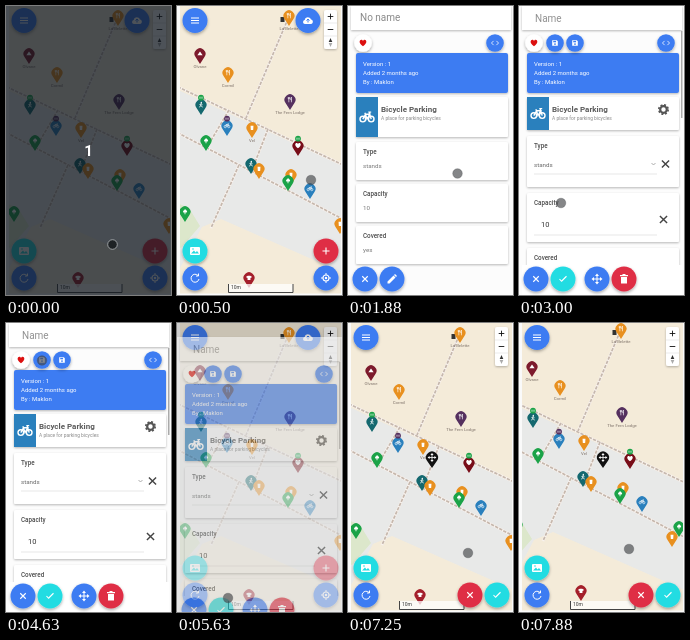
An HTML page that plays this animation: 165x289 px, repeating every 8000 ms.

```html
<!DOCTYPE html>
<html lang="en">
<head>
<meta charset="utf-8">
<title>Map editor</title>
<style>
html, body { margin: 0; width: 100%; height: 100%; overflow: hidden; background: #fafafa; }
svg { display: block; width: 100vw; height: 100vh; font-family: Roboto, "Open Sans", sans-serif; }
</style>
</head>
<body>
<svg id="stage" viewBox="0 0 165 289" preserveAspectRatio="none"></svg>
<script>
const LOOP = 8000, STEP = 125;
const BLUE = '#3c7cf2', CYAN = '#22dce2', RED = '#df2d45';
const ORANGE = '#e8901f', TEAL = '#14686f', GREEN = '#1ba348', BIKE = '#2a80bd', MAROON = '#7d1a2c', PURPLE = '#55305f';

// Icons are drawn around the origin in a box from -10 to 10.
const line = (d, w = 2.2) => `<path d="${d}" fill="none" stroke="currentColor" stroke-width="${w}" stroke-linejoin="round"/>`;
const solid = d => `<path d="${d}" fill="currentColor"/>`;
const ICONS = {
  menu: line('M-8-5H8M-8 0H8M-8 5H8', 2),
  cloud: solid('M-6 7C-11 7-11 0-6.500-1C-6-8 4-8 6-2C11-2 11 7 6 7Z') + '<path d="M0 4V-2M-3 0L0-3L3 0" fill="none" stroke="#3c7cf2" stroke-width="2"/>',
  image: '<rect x="-10" y="-8" width="20" height="16" rx="2" fill="currentColor"/><path d="M-8 5L-2-1L1 3L4 0L8 5Z" fill="#22dce2"/><circle cx="-4" cy="-4" r="1.600" fill="#22dce2"/>',
  refresh: line('M6-5A8 8 0 1 0 8 2M7-9V-4H2', 2),
  plus: line('M-7 0H7M0-7V7'),
  minus: line('M-7 0H7'),
  cross: line('M-5.500-5.500L5.500 5.500M5.500-5.500L-5.500 5.500'),
  check: line('M-7 0L-3 4.500L7-5.500'),
  locate: '<circle r="6" fill="none" stroke="currentColor" stroke-width="2.200"/><circle r="2.500" fill="currentColor"/>' + line('M0-10V-6M0 6V10M-10 0H-6M6 0H10', 2),
  move: line('M-8 0H8M0-8V8', 2) + solid('M0-11L4-6H-4ZM0 11L4 6H-4ZM-11 0L-6-4V4ZM11 0L6-4V4Z'),
  trash: solid('M-6-4H6V9H-6ZM-8-8H-3V-10H3V-8H8V-5.500H-8Z'),
  pencil: solid('M-9 9V5L3-7L7-3L-5 9ZM4-8L6-10L10-6L8-4Z'),
  save: solid('M-8-8H5L8-5V8H-8Z') + '<path d="M-5-6H3V-2H-5Z" fill="#3c7cf2"/><circle cy="3" r="2.500" fill="#3c7cf2"/>',
  code: line('M-4-6L-10 0L-4 6M4-6L10 0L4 6'),
  heart: solid('M0 9C-15-1-9-10-4-9Q-1-9 0-5Q1-9 4-9C9-10 15-1 0 9Z'),
  gear: '<circle r="6" fill="none" stroke="currentColor" stroke-width="4"/><circle r="8.500" fill="none" stroke="currentColor" stroke-width="3" stroke-dasharray="3.600 3.076"/>',
  fork: line('M-4-9V9M-6-9V-3H-2V-9M5 9V-9Q1-5 3 1H5'),
  bike: '<g fill="none" stroke="currentColor" stroke-width="2"><circle cx="-6" cy="3" r="4"/><circle cx="6" cy="3" r="4"/><path d="M-6 3L-2-4H4L0 3L-3-6M6 3L3-7H6"/></g>',
  walk: '<circle cx="1" cy="-8" r="2.500" fill="currentColor"/>' + line('M0-4L-1 2L-5 9M0 2L5 9M-5 1L0-4L5 0', 3),
  tree: solid('M-6 3Q-9-4-3-5Q0-12 4-5Q10-3 6 3H1.500V9H-1.500V3Z'),
  shop: solid('M-9 5L0-8L9 5Z'),
  shirt: solid('M-4-7H4L10-3L7 1L5 0V8H-5V0L-7 1L-10-3Z'),
  bin: solid('M-5-7H5L4 8H-4Z')
};

const at = (x, y, body, scale = 1) => `<g transform="translate(${x} ${y}) scale(${scale})">${body}</g>`;
const icon = (name, x, y, size, color = '#fff') => `<g color="${color}">${at(x, y, ICONS[name], size / 20)}</g>`;
const rect = (x, y, w, h, fill, extra = '') => `<rect x="${x}" y="${y}" width="${w}" height="${h}" fill="${fill}" ${extra}/>`;
const text = (x, y, size, str, fill = '#555', extra = '') => `<text x="${x}" y="${y}" font-size="${size}" fill="${fill}" ${extra}>${str}</text>`;
const button = (name, x, y, fill, r = 12.5, color = '#fff') =>
  `<circle cx="${x}" cy="${y}" r="${r}" fill="${fill}" filter="url(#lift)"/>` + icon(name, x, y, r * .8, color);
const card = (y, h) => rect(8, y, 152, h, '#fff', 'rx="1.500" filter="url(#shadow)"');
const group = (id, body) => `<g id="${id}">${body}</g>`;

function pin(x, y, fill, glyph, label = '', badge = '') {
  const shape = `<path d="M0 10L-4.600 2.800A5.500 5.500 0 1 1 4.600 2.800Z" fill="${fill}"/>`;
  return at(x, y, shape + icon(glyph, 0, -.3, 5.8)
    + (badge && `<circle cy="-7.300" r="2.900" fill="${badge}"/><path d="M-1-8.300V-6.300M1-8.300V-6.300" stroke="#fff" stroke-width=".7"/>`)
    + (label && text(0, 13.7, 4.3, label, '#7d7168', 'text-anchor="middle"')));
}

const path = d => `<path d="${d}" fill="none" stroke="#f8f2ee" stroke-width="2.600"/>
  <path d="${d}" fill="none" stroke="#c6b8ad" stroke-width="1.700" stroke-dasharray="3.300 1.300"/>`;

const mapLayer = rect(-20, -20, 220, 330, '#f4ebd9')
  + '<path d="M-20 74L200 176V282L44 213L25 221L2 264L-20 290Z" fill="#e8e9e8"/>'
  + '<path d="M-10 193L12 202L23 220L4 242L-10 236Z" fill="#dce7cb"/>'
  + path('M-20 71L200 175') + path('M-20 116L200 231') + path('M113 8L69 112')
  + path('M52 104L29 143') + path('M91 123L75 164') + path('M62 159L34 222')
  + rect(103.5, 11, 4, 5, '#333')
  + pin(112, 10, ORANGE, 'fork', 'La Belette') + pin(23, 48, MAROON, 'shop', 'Olvane')
  + pin(51, 67, ORANGE, 'fork', 'Cormil') + pin(113, 94, PURPLE, 'fork', 'The Fern Lodge')
  + pin(24, 99, TEAL, 'walk', '', GREEN) + pin(50, 120, BIKE, 'bike', '', PURPLE)
  + pin(75, 122, ORANGE, 'bin', 'Vel') + pin(29, 135, GREEN, 'tree')
  + pin(74, 158, TEAL, 'walk') + pin(82, 163, ORANGE, 'bin')
  + pin(121, 140, '#780d18', 'heart', '', GREEN)
  + pin(114, 169, ORANGE, 'bin') + pin(111, 175, GREEN, 'tree')
  + pin(133, 183, BIKE, 'bike') + pin(8, 206, GREEN, 'tree')
  + pin(163, 218, ORANGE, 'bin') + pin(170, 208, GREEN, 'tree')
  + pin(72, 272, '#a41f2b', 'shirt');

const controls = rect(147, 4, 13, 39, '#fff', 'rx="2" filter="url(#shadow)"')
  + '<path d="M147 17H160M147 30H160" stroke="#ddd" stroke-width=".6"/>'
  + icon('plus', 153.5, 10.5, 8, '#111') + icon('minus', 153.5, 23.5, 8, '#111')
  + '<path d="M151.700 36L153.500 32L155.300 36Z" fill="#333"/><path d="M151.700 37L153.500 41L155.300 37Z" fill="#aaa"/>'
  + rect(51.5, 278, 64.5, 8.5, '#fff', 'fill-opacity=".75"')
  + '<path d="M51.500 278V286.500H116V278" fill="none" stroke="#444" stroke-width="1"/>'
  + text(54, 283.4, 5, '10m', '#333');

const browseButtons = button('cloud', 131, 14.5, BLUE) + button('plus', 149, 245, RED) + button('locate', 149, 272, BLUE);
const placeButtons = button('cross', 122, 272, RED) + button('check', 149, 272, CYAN)
  + at(84, 134.5, '<path d="M0 10.500L-5 3.300A6 6 0 1 1 5 3.300Z" fill="#111"/>' + icon('move', 0, 0, 8));

const pageHead = title => rect(0, 0, 165, 289, '#fcfcfc')
  + rect(3, 0, 160, 24, '#fff', 'filter="url(#shadow)"') + title
  + button('heart', 15, 37, '#fff', 8.8, '#dc1010') + button('code', 147, 37, BLUE, 8.8)
  + rect(8, 47, 152, 40, BLUE, 'rx="2" filter="url(#shadow)"')
  + ['Version : 1', 'Added 2 months ago', 'By : Maklon'].map((s, i) => text(15, 59.5 + i * 9.3, 6, s, '#fff')).join('');

const feature = h => card(91, h) + rect(8, 91, 22, h, BIKE) + icon('bike', 19, 91 + h / 2, 14)
  + text(33, 105.7, 8, 'Bicycle Parking', '#5c5c5c', 'font-weight="700"')
  + text(33, 114, 4.9, 'A place for parking bicycles', '#888');

const label = (y, str) => text(15, y, 6.3, str, '#4d4d4d', 'font-weight="500"');
const underline = y => `<path d="M15 ${y}H138" stroke="#ddd" stroke-width=".7"/>`;

const viewForm = pageHead(text(12, 15, 10, 'No name', '#8a8a8a')) + feature(40)
  + [['Type', 'stands'], ['Capacity', '10'], ['Covered', 'yes']].map(([name, value], i) => {
    const y = 136 + i * 42;
    return card(y, 38) + label(y + 11.5, name) + text(15, y + 26, 6.2, value, '#777');
  }).join('');
const viewButtons = button('cross', 17, 273, BLUE) + button('pencil', 44, 273, BLUE);

const editForm = pageHead(text(16, 15.5, 10, 'Name', '#929292'))
  + button('save', 36, 37, BLUE, 8.8) + button('save', 56, 37, BLUE, 8.8)
  + feature(33) + icon('gear', 144.5, 103.5, 11, '#555')
  + card(130, 51) + label(141.5, 'Type') + text(15, 161, 6.2, 'stands', '#666') + underline(168)
  + '<path d="M132.500 157L134.500 159L136.500 157" fill="none" stroke="#999" stroke-width=".8"/>'
  + icon('cross', 146.5, 158, 13, '#444')
  + card(187, 49) + label(199, 'Capacity') + text(22, 220.5, 7.5, '10', '#333') + underline(229)
  + icon('cross', 144.5, 213.5, 13, '#444')
  + card(242, 60) + label(253.5, 'Covered')
  + rect(3, 259, 160, 30, '#fff') + rect(162, 25, 1.5, 87, '#aaa')
  + button('cross', 17, 273, BLUE) + button('check', 44, 273, CYAN)
  + button('move', 78, 273, BLUE) + button('trash', 105, 273, RED);

const shadow = (id, dy, blur, alpha) => `<filter id="${id}" x="-40%" y="-40%" width="180%" height="190%">
  <feDropShadow dx="0" dy="${dy}" stdDeviation="${blur}" flood-opacity="${alpha}"/></filter>`;

const stage = document.getElementById('stage');
stage.innerHTML = `<defs>${shadow('shadow', 1, 1.2, .28)}${shadow('lift', 1.5, 1.8, .34)}
  <clipPath id="mapArea"><rect x="3" width="161" height="287.500"/></clipPath></defs>`
  + rect(0, 0, 165, 289, '#fafafa')
  + `<g clip-path="url(#mapArea)">${group('map', mapLayer)}</g>` + controls
  + button('menu', 18, 14.5, BLUE) + button('image', 18, 245, CYAN) + button('refresh', 18, 272, BLUE)
  + group('browse', browseButtons) + group('place', placeButtons)
  + group('backdrop', rect(0, 0, 165, 289, '#000'))
  + group('view', viewForm) + group('viewBar', viewButtons) + group('edit', editForm)
  + group('dim', rect(0, 0, 165, 289, '#10161e', 'fill-opacity=".74"')
    + text(82.5, 150, 15, '1', '#fff', 'font-weight="700" text-anchor="middle"'))
  + '<circle id="cursor" r="4.800" stroke-width=".8"/>';

const [map, browse, place, backdrop, view, viewBar, edit, dim, cursor] =
  ['map', 'browse', 'place', 'backdrop', 'view', 'viewBar', 'edit', 'dim', 'cursor'].map(id => document.getElementById(id));

// Each row: time in steps, then values; linear in between.
function track(rows, k) {
  const next = rows.findIndex(row => row[0] > k);
  if (next < 0) return rows[rows.length - 1].slice(1);
  if (next === 0) return rows[0].slice(1);
  const a = rows[next - 1], b = rows[next], p = (k - a[0]) / (b[0] - a[0]);
  return a.slice(1).map((v, i) => v + (b[i + 1] - v) * p);
}

const CURSOR = [[2, 106.5, 238.5], [4, 134, 174], [5, 134, 174], [6, 133, 181], [13, 133, 181], [17, 86, 154],
  [19, 51, 278], [20, 51, 278], [21, 52, 271], [22, 52, 271], [24, 42, 197], [29, 48, 43], [30, 36, 37.5],
  [37, 36, 37.5], [40, 17, 281], [41, 17, 281], [43, 51, 275], [45, 51, 275], [47, 60, 264], [51, 149, 247],
  [53, 149, 247], [57, 122, 231], [58, 120, 230], [59, 120, 230], [63, 110, 226]];
const VIEW = [[10, 0, 40], [11, .36, 13], [12, .88, 3], [13, 1, 0]];
const EDIT = [[44, 1, 0], [45, .55, 14], [46, 0, 40]];
const PAN = [[59, 0, 0], [63, -10, -4]];

function show(node, opacity, x = 0, y = 0) {
  node.style.display = opacity > 0 ? '' : 'none';
  node.setAttribute('opacity', opacity);
  node.setAttribute('transform', `translate(${x} ${y})`);
}

function render(ms) {
  const k = Math.floor((ms % LOOP) / STEP);
  const [viewAlpha, viewY] = track(VIEW, k), [editAlpha, editY] = track(EDIT, k);
  const placing = track([[52, 0], [54, 1]], k)[0];
  const viewing = k < 23;
  show(map, 1, ...track(PAN, k));
  show(browse, 1 - placing);
  show(place, placing);
  show(backdrop, .32 * (viewing ? viewAlpha : editAlpha));
  show(view, viewing ? viewAlpha : 0, 0, viewY);
  show(viewBar, viewing && viewAlpha === 1 ? 1 : 0);
  show(edit, viewing ? 0 : editAlpha, 0, editY);
  show(dim, k < 3 ? 1 : 0);
  show(cursor, 1, ...track(CURSOR, k));
  cursor.setAttribute('fill', k < 3 ? '#1e2225' : 'rgba(70,72,75,.66)');
  cursor.setAttribute('stroke', k < 3 ? '#b5b9bb' : 'rgba(70,72,75,.4)');
}

function tick(now) {
  render(now);
  requestAnimationFrame(tick);
}
render(0);
requestAnimationFrame(tick);
</script>
</body>
</html>
```
